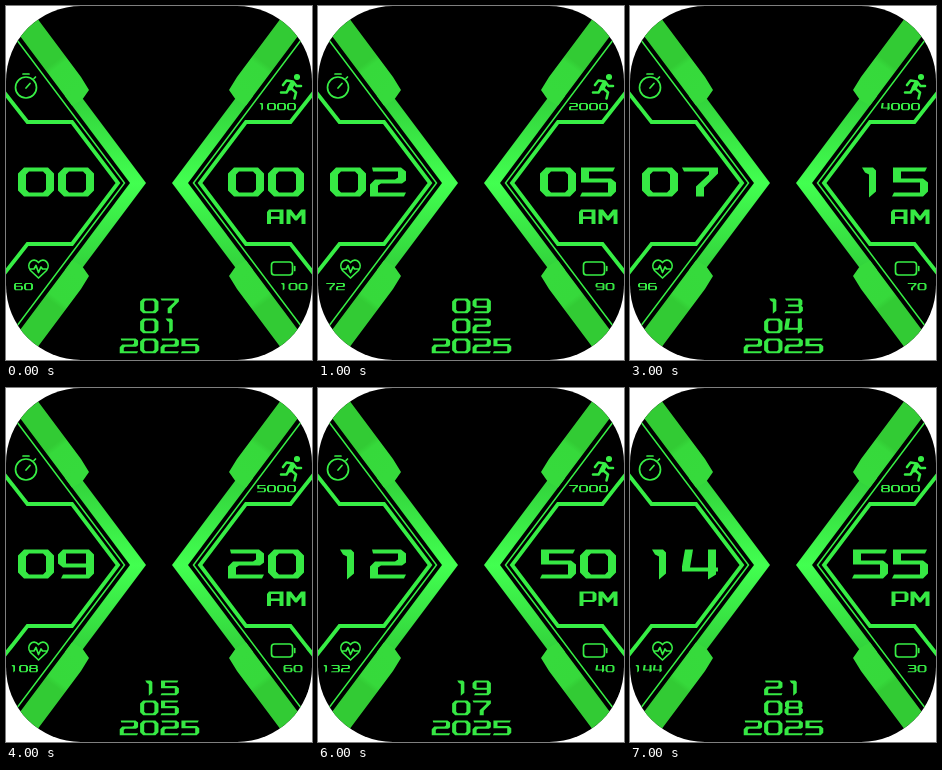
These frames come from a looping animation (306 px wide and 354 px high, 8 s). An HTML page:

```html
<!DOCTYPE html>
<html lang="en">
<head>
<meta charset="utf-8">
<title>Watch face</title>
<style>
  html, body { margin: 0; width: 306px; height: 354px; overflow: hidden; background: #fff; }
  svg { display: block; }
  .line { fill: none; stroke: #37ee45; stroke-miterlimit: 9; }
  .icon { stroke-width: 1.7; stroke-linecap: round; stroke-linejoin: round; }
</style>
</head>
<body>
<svg width="306" height="354" viewBox="0 0 306 354" role="img">
  <defs>
    <clipPath id="screen"><rect width="306" height="354" rx="75"/></clipPath>
    <linearGradient id="wide" gradientUnits="userSpaceOnUse" x1="20" y1="20" x2="70" y2="87">
      <stop stop-color="#32cb34"/><stop offset=".55" stop-color="#32cb34"/>
      <stop offset=".62" stop-color="#36d93b"/><stop offset="1" stop-color="#36da3c"/>
    </linearGradient>
    <linearGradient id="arm" gradientUnits="userSpaceOnUse" x1="0" y1="90" x2="0" y2="177">
      <stop stop-color="#32d23b"/><stop offset="1" stop-color="#42ff50"/>
    </linearGradient>
    <g id="quarter">
      <path fill="url(#arm)" d="M58.900 90L77 93L140 177H124Z"/>
      <path fill="url(#wide)" d="M-8.500 0H22L75 71L83 84L76 94L66 99.500L58.900 90Z"/>
    </g>
    <g id="half">
      <use href="#quarter"/>
      <use href="#quarter" transform="matrix(1 0 0 -1 0 354)"/>
      <path class="line" stroke-width="1.500" d="M0 19.500L118.500 177L0 334.500"/>
      <path class="line" stroke-width="3.800" d="M-2 86L21.500 116H66L112 177L66 238H21.500L-2 268"/>
    </g>
  </defs>
  <g clip-path="url(#screen)">
    <rect width="306" height="354"/>
    <use href="#half"/>
    <use href="#half" transform="matrix(-1 0 0 1 306 0)"/>
    <g class="line icon">
      <!-- stopwatch -->
      <circle cx="20" cy="81.500" r="10.500"/>
      <path d="M17 68H23M28 72.500L29.500 71M20 82L24 77.500"/>
      <!-- heart rate -->
      <path d="M32.500 272L24.500 264.500C19.500 258 27 250 32.500 256.500C38 250 45.500 258 40.500 264.500ZM24 263H28L30 259.500L32.500 266.500L35 261L36.500 263H41"/>
      <!-- battery -->
      <rect x="265.500" y="256" width="21" height="13" rx="3"/>
      <path d="M288.700 260.500V264.500"/>
      <!-- runner -->
      <path stroke-width="2.600" d="M277 79L280.500 74.500L287 75.500L290.500 80H295M275 86.500H280.500L283 82.500M286 83L290 86.500L288.500 92.500"/>
      <path stroke-width="4.500" style="stroke-width:5" d="M286.500 77.500L284 82"/>
      <circle cx="291" cy="71" r="2.200" fill="#37ee45"/>
    </g>
    <g id="text" fill="#36e844" fill-rule="evenodd"></g>
  </g>
</svg>
<script>
// Wide angular typeface: cells 36 x 29, advance 40.
const glyphs = {
  0: 'M6 0H30L36 6V23L30 29H6L0 23V6ZM11 4L8 7V22L11 25H25L28 22V7L25 4Z',
  1: 'M10 0H21L24 3V24L17 30V7L13 5Z',
  2: 'M2 0H31L36 4V13L32 16H11L8 18V25H36L34 29H0V17L5 12H25L28 10V4H3Z',
  3: 'M1 0H31L35 4V12L33 14L36 17V24L31 29H0L2 25H28V16H7V12H27V4H3Z',
  4: 'M3 0H11L8 18H26V0H34V18H36V22H34V25L26 30V22H0V17Z',
  5: 'M1 0H35L33 4H9V11H31L36 15V24L31 29H0L2 25H28V15H1Z',
  6: 'M5 0H33L31 4H8V11H31L36 15V24L31 29H5L0 24V5ZM8 15V25H28V15Z',
  7: 'M0 0H36V6L22 20V29H14V19L27 7V4H2Z',
  8: 'M5 0H31L35 4V12L33 14L36 17V24L31 29H5L0 24V17L3 14L1 12V4ZM9 4V12H27V4ZM8 16V25H28V16Z',
  9: 'M31 29H3L5 25H28V18H5L0 14V5L5 0H31L36 5V24ZM28 14V4H8V14Z',
  A: 'M5 0H34V29H26V19H9V29H1V5ZM9 5V14H26V5Z',
  P: 'M2 0H31L36 4V17L31 21H10V29H2ZM10 4V17H28V4Z',
  M: 'M0 0H9L19 13L29 0H38V29H30V11L21 22H17L8 11V29H0Z'
};
const hours = [0, 2, 4, 7, 9, 10, 12, 14];
const minutes = [0, 5, 10, 15, 20, 25, 50, 55];
const text = document.getElementById('text');
const svg = document.querySelector('svg');
const two = n => String(n).padStart(2, '0');

function write(value, centre, top, scale) {
  const chars = [...String(value)];
  const left = centre - (chars.length * 40 - 4) * scale / 2;
  const paths = chars.map((c, i) => `<path transform="translate(${i * 40})" d="${glyphs[c]}"/>`);
  return `<g transform="translate(${left} ${top}) scale(${scale})">${paths.join('')}</g>`;
}

function show(step) {
  const hour = two(hours[step]), minute = two(minutes[step]);
  const half = hours[step] < 12 ? 'AM' : 'PM';
  svg.setAttribute('aria-label', `${hour}:${minute} ${half}`);
  text.innerHTML =
    write(hour, 50, 161.5, 1) +
    write(minute, 260, 161.5, 1) +
    write(half, 279.5, 203.5, .5) +
    write(1000 * (step + 1), 270.5, 97, .25) +
    write(60 + 12 * step, 17.5, 277, .25) +
    write(100 - 10 * step, 287, 277, .25) +
    write(two(7 + 2 * step), 153.5, 292.5, .51) +
    write(two(step + 1), 153.5, 312.5, .51) +
    write(2025, 153.5, 332.5, .51);
}

let shown = -1;
function tick() {
  const step = Math.floor(performance.now() / 1000) % 8;
  if (step !== shown) show(shown = step);
  requestAnimationFrame(tick);
}
tick();
</script>
</body>
</html>
```
